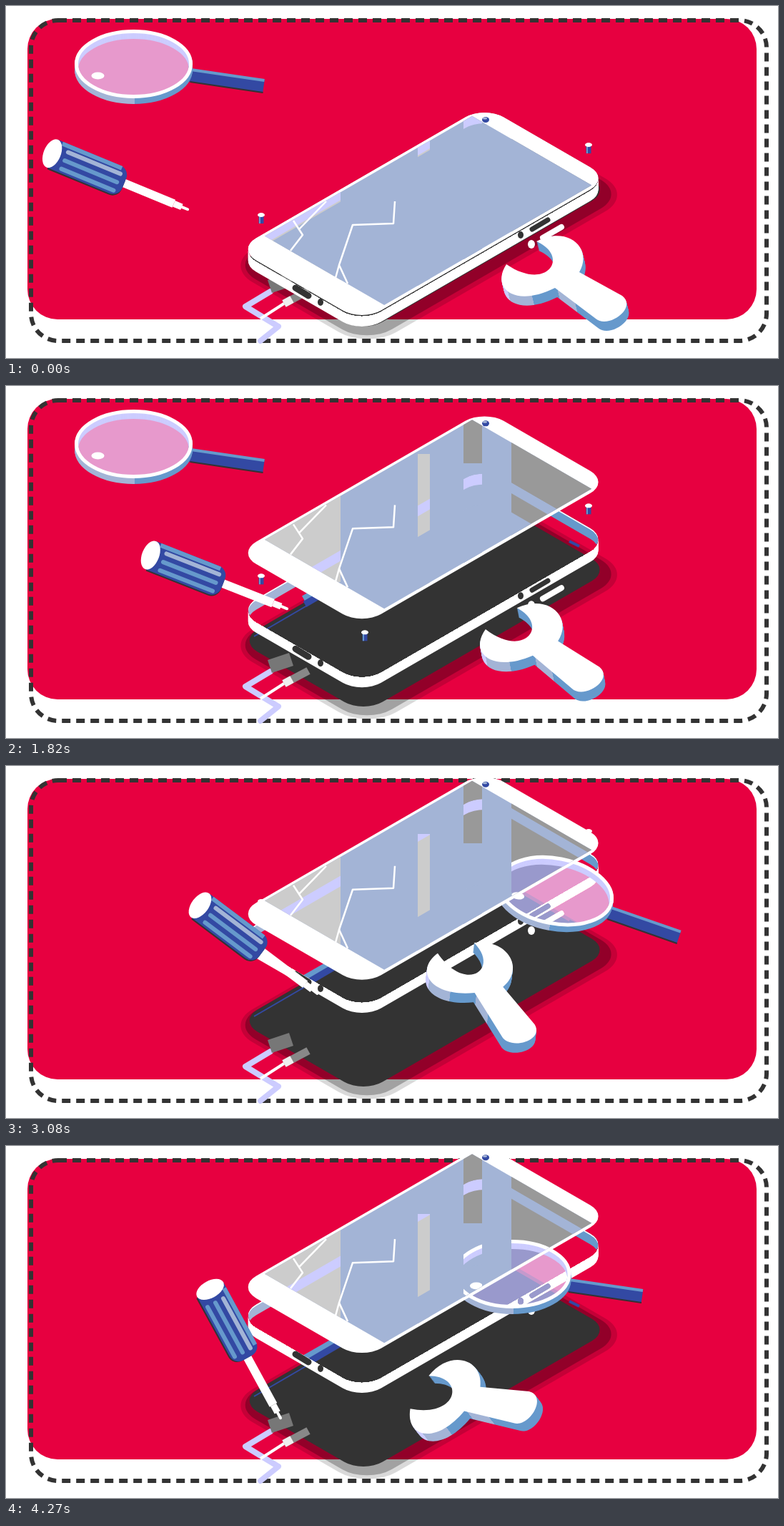
Write an HTML page with a canvas that moves like this. It is 1080 by 492 pixels and loops after 4.34 s.

```html
<!DOCTYPE html>
<html lang="en">
<head>
<meta charset="utf-8">
<title>Phone repair</title>
<style>
html, body { margin: 0; width: 100%; height: 100%; overflow: hidden; background: #fff; }
canvas { display: block; width: 100%; height: 100%; }
</style>
</head>
<body>
<canvas width="1080" height="492"></canvas>
<script>
const LOOP = 4340, STEP = 70, W = 1080, H = 492, DEPTH = 15;
const RED = '#e70040', DARK = '#333', BLUE = '#3349a3', SKY = '#69c', MIST = '#a3b4d6', LILAC = '#ccf', WHITE = '#fff';
const ctx = document.querySelector('canvas').getContext('2d');

// ---- timing ----
const progress = (t, from, to) => Math.min(1, Math.max(0, (t - from) / (to - from)));
const smooth = (t, from, to) => { const u = progress(t, from, to); return u * u * (3 - 2 * u); };
const easeOut = (t, from, to, power) => 1 - (1 - progress(t, from, to)) ** power;

// Each leg blends the pose [x, y, degrees] into the next one
const travel = (t, start, ...legs) => legs.reduce(
  (pose, [from, to, ...goal]) => pose.map((v, i) => v + (goal[i] - v) * smooth(t, from, to)), start);

const panelLift = t => -28 * easeOut(t, 0, 490, 2) - 94 * easeOut(t, 1260, 2200, 2) - 21 * easeOut(t, 2240, LOOP, 1.5);
const ringLift = t => -103 * smooth(t, 1610, 2240);
const driverPose = t => travel(t, [256, 285, 22.4], [0, 800, 350, 375, 46], [1260, 1820, 395, 312, 21.4],
  [1820, 2240, 398, 346, 32.4], [2240, 3080, 437, 319, 36.9], [3080, 4270, 385, 382, 61.3]);
const wrenchPose = t => travel(t, [752, 368, 0], [1610, 2240, 638, 298, 12],
  [2240, 3080, 650, 287, 21], [3080, 4270, 616, 353, -23.5]);
const lensPose = t => travel(t, [178.5, 85, 0], [2160, 3000, 771, 177, 11],
  [3000, 3710, 679, 221, 7], [3710, 4270, 708, 183, 0]);

// ---- drawing helpers ----
function fill(path, color) { ctx.fillStyle = color; ctx.fill(path); }
function stroke(path, color, width, cap = 'butt') {
  Object.assign(ctx, { strokeStyle: color, lineWidth: width, lineCap: cap, lineJoin: 'round' });
  ctx.stroke(path);
}
function line(x1, y1, x2, y2, color, width, cap) {
  stroke(new Path2D(`M${x1} ${y1}L${x2} ${y2}`), color, width, cap);
}
function oval(x, y, rx, ry, from = 0, to = 2 * Math.PI) {
  const path = new Path2D();
  path.ellipse(x, y, rx, ry, 0, from, to);
  return path;
}
function box(x, y, w, h, radius = 0) {
  const path = new Path2D();
  path.roundRect(x, y, w, h, radius);
  return path;
}
function outside(path) {
  const rest = box(0, 0, W, H);
  rest.addPath(path);
  return rest;
}
function within(clips, paint) {
  ctx.save();
  clips.forEach(path => ctx.clip(path, 'evenodd'));
  paint();
  ctx.restore();
}
function posed([x, y, degrees], paint) {
  ctx.save();
  ctx.translate(x, y);
  ctx.rotate(degrees * Math.PI / 180);
  paint();
  ctx.restore();
}
// Horizontal bands of flat colour: color, start share, color, ...
function bands(x1, x2, first, ...rest) {
  const g = ctx.createLinearGradient(x1, 0, x2, 0);
  let color = first;
  g.addColorStop(0, color);
  for (let i = 0; i < rest.length; i += 2) {
    g.addColorStop(rest[i], color);
    g.addColorStop(rest[i], color = rest[i + 1]);
  }
  g.addColorStop(1, color);
  return g;
}

// ---- phone, laid out flat and projected isometrically ----
function iso(path, dx, dy) {
  const out = new Path2D();
  out.addPath(path, new DOMMatrix([0.866, -0.5, 0.866, 0.5, 323 + dx, 340 + dy]));
  return out;
}
const slab = (dy, dx = 0, grow = 0) => iso(box(-grow, -grow, 400 + 2 * grow, 202 + 2 * grow, 31 + grow), dx, dy);
const screen = dy => iso(box(41, 4, 335, 193), 0, dy);
const plate = slab(16, 2);

function drawStage() {
  ctx.clearRect(0, 0, W, H);
  fill(box(30, 18, 1020, 420, 42), RED);
  ctx.setLineDash([12, 8]);
  stroke(box(35, 20, 1029, 448, 38), DARK, 6);
  ctx.setLineDash([]);
}

function drawBase() {
  fill(slab(23, 8, 15), 'rgba(0,0,0,.15)');
  fill(slab(22, 7, 9), 'rgba(0,0,0,.26)');
  fill(plate, DARK);
  line(347, 350, 440, 296, BLUE, 2);
  line(416, 297, 500, 249, SKY, 8);
  line(418, 305, 500, 257, BLUE, 9);
  line(788, 217, 802, 224, BLUE, 4);

  stroke(new Path2D('M370 399L335 420L381 448L356 468'), LILAC, 8, 'round');
  line(395, 412, 356, 437, WHITE, 4);
  line(369, 392, 399, 382, '#777', 19);
  line(389, 416, 423, 398, '#888', 11);
  line(389, 416, 400, 410, '#eee', 11);
}

function drawWall(lift, left, right) {
  within([slab(lift), outside(slab(lift + DEPTH))], () =>
    fill(slab(lift), bands(340, 830, left, 0.67, right)));
}

function drawRing(lift) {
  drawWall(lift, MIST, SKY);
  within([slab(lift), outside(slab(lift + 2))], () => fill(slab(lift), WHITE));
  within([outside(slab(lift + 2))], () => {
    for (let d = 3; d <= DEPTH + 1; d++) within([outside(box(0, 0, W, 241 + lift))], () => fill(slab(lift + d), WHITE));
  });
  ctx.save();
  ctx.translate(0, lift);
  line(405, 394, 423, 405, DARK, 9, 'round');
  line(736, 312, 758, 299, DARK, 7, 'round');
  fill(oval(440, 414, 4, 5), DARK);
  fill(oval(720, 320, 4, 5), DARK);
  fill(oval(735, 333, 5, 6), WHITE);
  line(751, 324, 777, 309, WHITE, 8, 'round');
  for (const [x, y] of [[357, 292], [815, 194], [502, 371]]) {
    line(x, y, x, y + 12, BLUE, 7);
    line(x - 2, y, x - 2, y + 12, SKY, 2);
    fill(oval(x, y, 5, 3), WHITE);
  }
  ctx.restore();
}

// Static vertical strips where the screen lets the background through
const strips = new Path2D('M340 0H468V492H340ZM576 95H593V492H576ZM640 0H666V492H640ZM707 0H830V492H707Z');
const cracks = new Path2D('M448 273L410 312M402 300L415 320L398 342M544 273L542 304L485 306L466 362L478 388M466 362L461 380');

function drawPanel(t, lift) {
  fill(slab(lift), WHITE);
  fill(screen(lift), MIST);
  within([screen(lift), strips], () => {
    fill(box(0, 0, W, H), bands(0, W, '#ccc', 0.57, '#999'));
    fill(box(640, 108, 26, H), MIST);
    fill(plate, MIST);
    drawWall(ringLift(t), LILAC, MIST);
    drawLens(t);
  });
  ctx.save();
  ctx.translate(0, lift);
  stroke(cracks, WHITE, 2.5);
  fill(oval(671, 159, 5, 4), BLUE);
  fill(oval(670, 157, 3, 1.5), MIST);
  ctx.restore();
}

// ---- tools ----
function drawLens(t) {
  posed(lensPose(t), () => {
    line(79, 12, 182, 27, BLUE, 18);
    line(80, 4, 183, 19, SKY, 4);
    line(79, 21, 181, 36, DARK, 2);
    ctx.globalCompositeOperation = 'lighten';
    fill(oval(0, -1, 77, 42), '#9999cc');
    ctx.globalCompositeOperation = 'source-over';
    const side = bands(-82, 82, MIST, 0.51, SKY);
    for (let d = 8; d >= 0; d--) {
      stroke(oval(0, d - 4, 80, 45.5, 0, Math.PI), d ? side : WHITE, 5);
      stroke(oval(0, d - 4, 80, 45.5, Math.PI), d ? LILAC : WHITE, 5);
    }
    fill(oval(-50, 12.5, 9, 5), WHITE);
  });
}

const steel = new Path2D('M700 361C678 395 712 422 768 394L825 437C842 452 884 422 862 405L802 372C822 338 785 306 742 329C790 350 757 400 700 361Z');

function drawWrench(t) {
  posed(wrenchPose(t), () => {
    ctx.translate(-752, -368);
    const side = bands(693, 871, LILAC, 0.05, MIST, 0.24, SKY, 0.44, MIST, 0.58, SKY);
    for (let d = 13; d >= 0; d--) {
      ctx.save();
      ctx.translate(d / 4, d);
      fill(steel, d ? side : WHITE);
      ctx.restore();
    }
  });
}

function drawDriver(t) {
  posed(driverPose(t), () => {
    ctx.translate(-207, 0);
    line(104, 0, 184, 0, WHITE, 12);
    line(184, 0, 196, 0, WHITE, 9);
    line(196, 0, 205, 0, WHITE, 4, 'round');
    fill(box(2, -17, 107, 40, [0, 14, 14, 0]), DARK);
    fill(box(0, -21, 109, 42, [0, 14, 14, 0]), BLUE);
    line(8, -18, 98, -18, SKY, 6);
    for (let i = 0; i < 3; i++) line(20, 12.5 * i - 10, 99, 12.5 * i - 10, i ? SKY : MIST, 6, 'round');
    fill(oval(0, 0, 12, 21), WHITE);
  });
}

function draw() {
  const t = Math.floor(performance.now() % LOOP / STEP) * STEP;
  drawStage();
  drawBase();
  drawRing(ringLift(t));
  drawLens(t);
  drawPanel(t, panelLift(t));
  drawWrench(t);
  drawDriver(t);
  requestAnimationFrame(draw);
}
draw();
</script>
</body>
</html>
```
